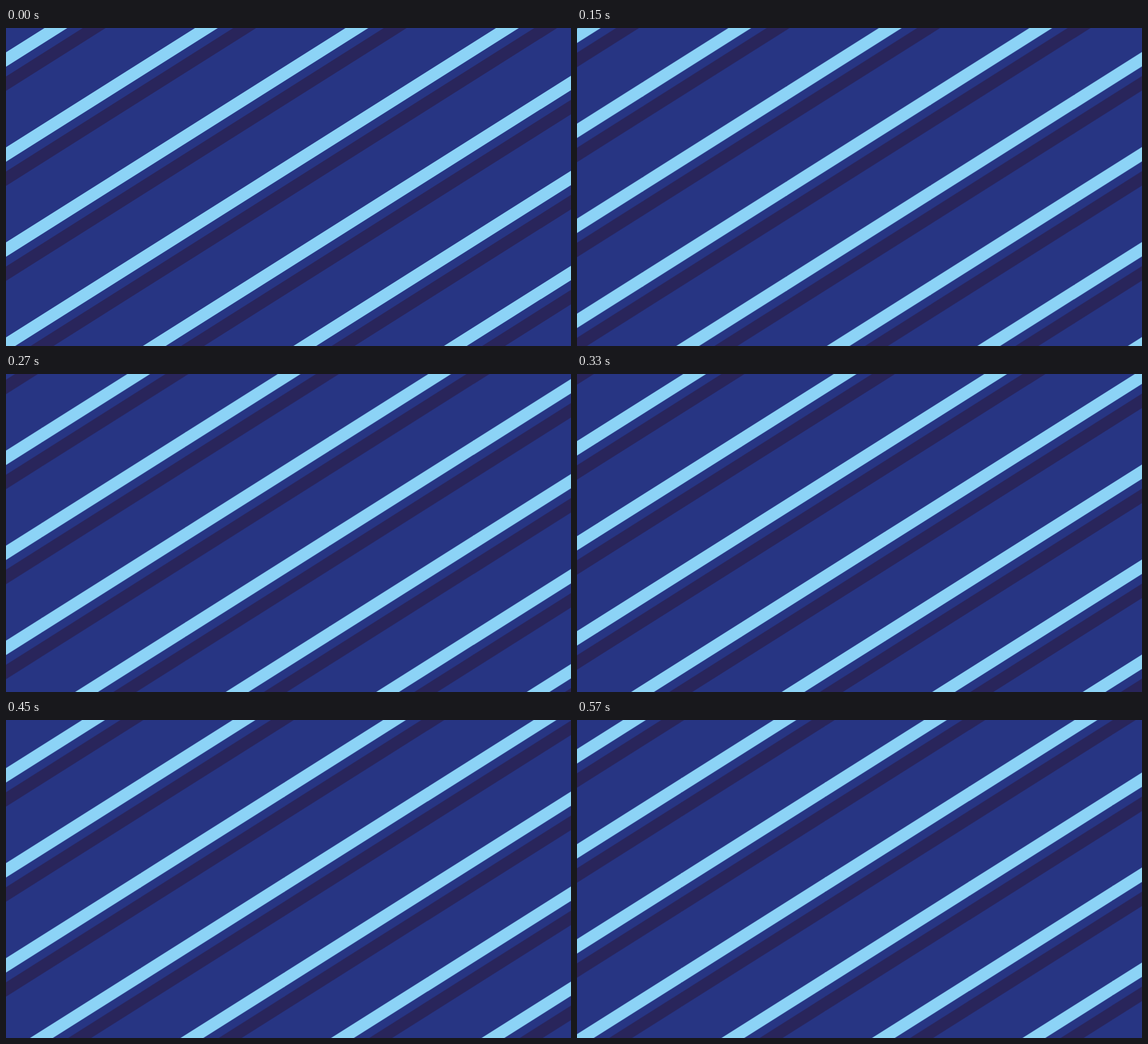
An HTML page that plays this animation: 998 px wide and 561 px high, repeating every 0.6 s.

```html
<!DOCTYPE html>
<html lang="en">
<head>
<meta charset="utf-8">
<title>Diagonal stripes</title>
<style>
  html, body { margin: 0; width: 100%; height: 100%; overflow: hidden; background: #273583; }
  svg { display: block; width: 100%; height: 100%; }
</style>
</head>
<body>
<svg viewBox="0 0 998 561" preserveAspectRatio="none"><g id="stripes"></g></svg>
<script>
  const HEIGHT = 561;
  const PERIOD = 265.85;   // horizontal distance between repeats
  const SLOPE = 1.586;     // leftward run per pixel of drop
  const START = 68.1;      // left edge of the first light band at y = 0
  const BAND = 40.3;       // horizontal band width
  const GAP = 67.6;        // light edge to dark edge
  const LIGHT = '#8cd3f6';
  const DARK = '#29255b';

  const stripes = document.getElementById('stripes');

  function addBand(x, fill) {
    const run = HEIGHT * SLOPE;
    const band = document.createElementNS('http://www.w3.org/2000/svg', 'polygon');
    band.setAttribute('points',
      `${x},0 ${x + BAND},0 ${x + BAND - run},${HEIGHT} ${x - run},${HEIGHT}`);
    band.setAttribute('fill', fill);
    stripes.append(band);
  }

  for (let i = -1; i < 9; i++) {
    const x = START + i * PERIOD;
    addBand(x, LIGHT);
    addBand(x + GAP, DARK);
  }

  // One full period per loop, in 30 ms steps
  stripes.animate(
    [{ transform: 'translateX(0px)' }, { transform: `translateX(${-PERIOD}px)` }],
    { duration: 600, iterations: Infinity, easing: 'steps(20, end)' }
  );
</script>
</body>
</html>
```
